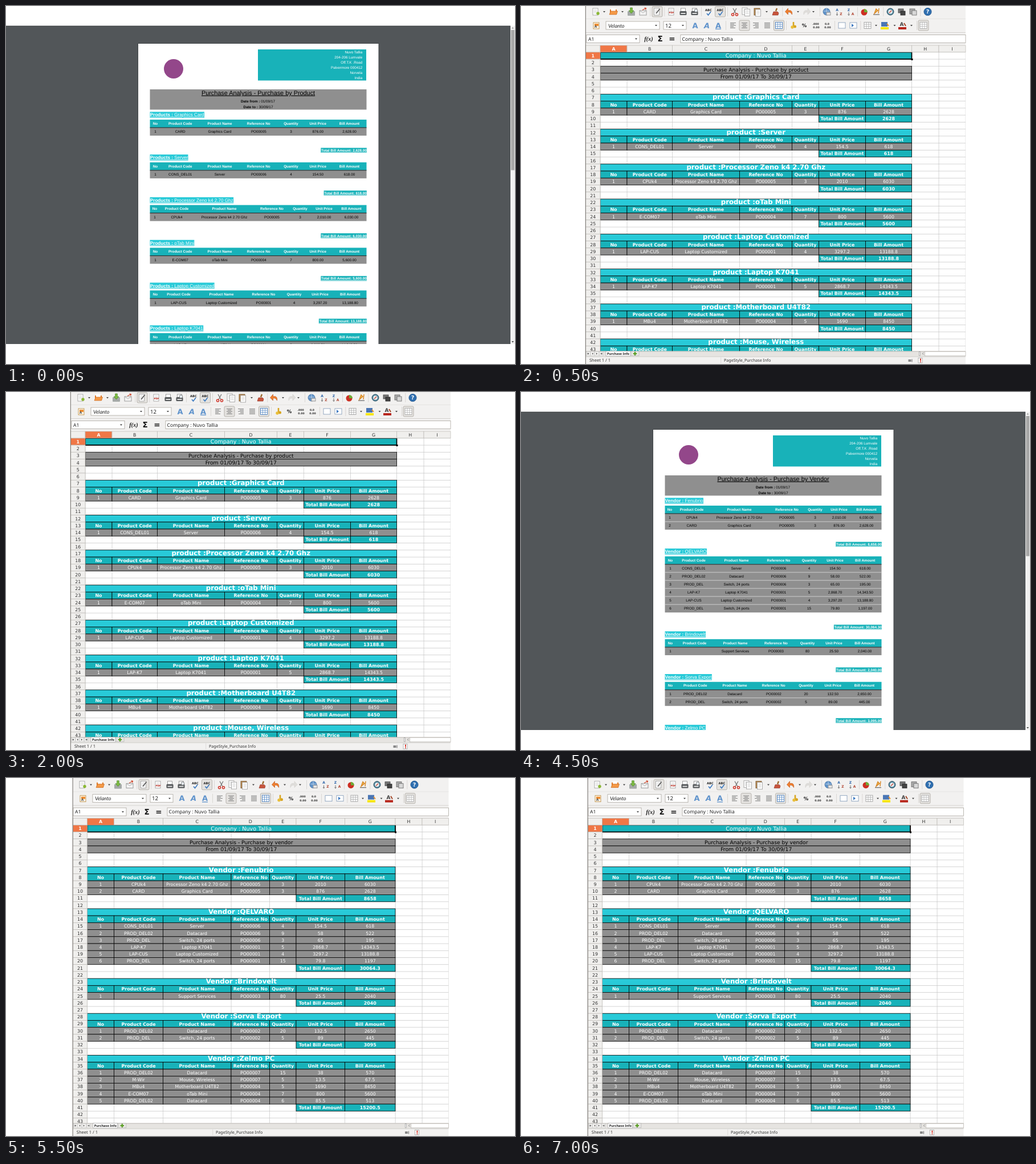
Animation of 893x627 px, one loop 8 s. Source, as an HTML page:

```html
<!DOCTYPE html>
<html lang="en">
<head>
<meta charset="utf-8">
<title>Purchase analysis reports</title>
<style>
html, body { margin: 0; width: 100%; height: 100%; overflow: hidden; background: #fff; }
svg { display: block; width: 100vw; height: 100vh; }
text { text-rendering: geometricPrecision; }
.pdf { font-family: "Liberation Sans", Arial, sans-serif; }
.calc { font-family: "DejaVu Sans", sans-serif; }
.ui { font-family: "Noto Sans", sans-serif; }
.serif { font-family: "Liberation Serif", serif; }
.lato { font-family: Lato, sans-serif; }
.m { text-anchor: middle; }
.e { text-anchor: end; }
.b { font-weight: bold; }
.i { font-style: italic; }
.u { text-decoration: underline; }
</style>
</head>
<body>
<svg id="stage" viewBox="0 0 893 627" preserveAspectRatio="none"></svg>
<script>
const TEAL = '#18b2b9', CYAN = '#28cad8', GREY = '#8f8f8f', PANEL = '#f2f1f0';
const COMPANY = 'Nuvo Tallia';
const HEAD = ['No', 'Product Code', 'Product Name', 'Reference No', 'Quantity', 'Unit Price', 'Bill Amount'];

// code, name, reference, quantity, unit price
const item = (code, name, ref, qty, price) => ({ code, name, ref: 'PO0000' + ref, qty, price, sum: qty * price });
const card = item('CARD', 'Graphics Card', 5, 3, 876);
const server = item('CONS_DEL01', 'Server', 6, 4, 154.5);
const cpu = item('CPUk4', 'Processor Zeno k4 2.70 Ghz', 5, 3, 2010);
const tablet = item('E-COM07', 'oTab Mini', 4, 7, 800);
const custom = item('LAP-CUS', 'Laptop Customized', 1, 4, 3297.2);
const laptop = item('LAP-K7', 'Laptop K7041', 1, 5, 2868.7);
const board = item('MBu4', 'Motherboard U4T82', 4, 5, 1690);
const mouse = item('M-Wir', 'Mouse, Wireless', 7, 5, 13.5);
const data = (ref, qty, price) => item('PROD_DEL02', 'Datacard', ref, qty, price);
const port = (ref, qty, price) => item('PROD_DEL', 'Switch, 24 ports', ref, qty, price);

// column centres of the printed tables
const NARROW = [262, 305.7, 375, 443.3, 500, 547.3, 602.5];
const WIDE = [261, 299.5, 383, 466.5, 516, 558, 606];
const MID = [262, 303, 378, 452, 505.5, 551, 603.8];
const OPEN = [262, 304.5, 376, 447.5, 502.5, 549, 603];

const block = (name, cols, ...items) => ({ name, cols, items });
const products = [[card, NARROW], [server, NARROW], [cpu, WIDE], [tablet, NARROW], [custom, MID],
  [laptop, NARROW], [board, MID], [mouse, NARROW]].map(([it, cols]) => block(it.name, cols, it));
const vendors = [
  block('Fenubrio', WIDE, cpu, card),
  block('QELVARO', MID, server, data(6, 9, 58), port(6, 3, 65), laptop, custom, port(1, 15, 79.8)),
  block('Brindovelt', OPEN, item('', 'Support Services', 3, 80, 25.5)),
  block('Sorva Export', NARROW, data(2, 20, 132.5), port(2, 5, 89)),
  block('Zelmo PC', NARROW, data(7, 15, 38), mouse, board, tablet, data(4, 6, 85.5))
];

const money = n => n.toLocaleString('en-US', { minimumFractionDigits: 2, maximumFractionDigits: 2 });
const plain = n => String(+n.toFixed(2));
const total = b => b.items.reduce((s, it) => s + it.sum, 0);
const cells = (it, n, fmt) => [n + 1, it.code, it.name, it.ref, it.qty, fmt(it.price), fmt(it.sum)];

const rect = (x, y, w, h, fill, more = '') => `<rect x="${x}" y="${y}" width="${w}" height="${h}" fill="${fill}" ${more}/>`;
const box = (x, y, w, h, fill, line = '#000', sw = 0.8) => rect(x, y, w, h, fill, `stroke="${line}" stroke-width="${sw}"`);
const path = (d, line, sw = 1, fill = 'none') => `<path d="${d}" fill="${fill}" stroke="${line}" stroke-width="${sw}"/>`;
const dot = (x, y, r, fill, more = '') => `<circle cx="${x}" cy="${y}" r="${r}" fill="${fill}" ${more}/>`;
// y is the middle of the capitals
const text = (x, y, s, size, fill = '#000', cls = 'm') =>
  `<text x="${x}" y="${y + size * 0.36}" font-size="${size}" fill="${fill}" class="${cls}">${s}</text>`;
const clip = (id, x, y, w, h, body) =>
  `<clipPath id="${id}">${rect(x, y, w, h, '#000')}</clipPath><g clip-path="url(#${id})">${body}</g>`;

const pen = document.createElement('canvas').getContext('2d');
function widthOf(s, size, weight = '') {
  pen.font = `${weight} 100px "Liberation Sans", Arial, sans-serif`;
  return pen.measureText(s).width * size / 100;
}

function printBlock(b, label, y) {
  const size = 6.35, lead = label + ' :', n = b.items.length, top = y + 22.4, end = top + 14.05 * n;
  const w = widthOf(lead + ' ', 8.14, 'bold') + widthOf(b.name, 8.14);
  const sum = 'Total Bill Amount: ' + money(total(b)), sw = widthOf(sum, 6.3, 'bold');
  let s = rect(252.5, y - 5.3, w + 0.5, 10.7, CYAN) +
    text(252.8, y - 0.2, `<tspan class="b">${lead}</tspan> ${b.name}`, 8.14, '#fff', 'u') +
    rect(252.5, y + 8.4, 380, 14, TEAL) + rect(252.5, top, 380, end - top, GREY) +
    rect(252.5, top - 0.5, 380, 1, '#222');
  b.cols.forEach((x, c) => s += text(x, y + 14.9, HEAD[c], size, '#fff', 'm b'));
  b.items.forEach((it, r) => {
    const ry = top + 14.05 * r;
    if (r) s += rect(252.5, ry - 0.4, 380, 0.8, '#ddd');
    cells(it, r, money).forEach((v, c) => s += text(b.cols[c], ry + 7.1, v, size));
  });
  return s + rect(632.8 - sw - 0.4, end + 21.4, sw + 0.4, 8.6, TEAL) +
    text(632.8, end + 25.6, sum, 6.3, '#fff', 'e b u');
}

function report(id, kind, label, blocks) {
  let s = rect(0, 34.5, 885, 557.5, '#525659') + rect(0, 34.5, 885, 1.2, '#3c3f42') +
    rect(231, 65, 423.5, 540, '#43474a') + rect(232, 66, 421.5, 540, '#fff') +
    dot(294, 110, 17, '#93478a') + rect(442, 76, 190, 54.5, TEAL);
  [COMPANY, '204-206 Lumvale', 'Off.T.K .Road', 'Palvermore 000412', 'Norvela', 'India']
    .forEach((line, n) => s += text(625.3, 80.8 + 9.05 * n, line, 6.35, '#fff', 'e'));
  s += rect(252.5, 146, 380, 35.5, GREY) +
    text(442.5, 151.8, 'Purchase Analysis - Purchase by ' + kind, 10.87, '#000', 'm u') +
    text(442, 167.2, '<tspan class="b">Date from :</tspan> 01/09/17', 6.35) +
    text(442.5, 176.6, '<tspan class="b">Date to :</tspan> 30/09/17', 6.35);
  let y = 190.6;
  for (const b of blocks) {
    s += printBlock(b, label, y);
    y += 60.75 + 14.05 * b.items.length;
  }
  s += rect(885, 34.5, 8, 557.5, '#f1f1f1') + rect(886, 42, 6, 245.5, '#a8a8a8') +
    path('M887 39.5h4l-2-2.4z', 'none', 0, '#999') + path('M887 587h4l-2 2.4z', 'none', 0, '#444');
  return `<g class="pdf">${clip(id, 0, 34.5, 893, 557.5, s)}</g>`;
}

const drop = (x, y) => path(`M${x - 2} ${y - 1}h4l-2 2.5z`, 'none', 0, '#444');
const rule = (x, y) => rect(x, y - 8, 0.7, 16, '#cfccc8');
const pressed = (x, y) => rect(x - 9, y - 9, 18, 18, '#e4e2df', 'rx="2" stroke="#aaa69f" stroke-width=".8"');
const sheetIcon = (x, y, line = '#999') => box(x - 5, y - 6, 9, 12, '#fff', line, 0.8) +
  path(`M${x - 3} ${y - 3}h5m-5 2.5h5m-5 2.5h5`, '#bbb', 0.7);
const printer = (x, y) => rect(x - 4, y - 6, 8, 6, '#fff', 'stroke="#777" stroke-width=".7"') +
  rect(x - 6, y - 1, 12, 7, '#55585a', 'rx="1.5"') + rect(x - 4, y + 2, 8, 2, '#ddd');
const lines = (x, y, ws, at) => ws.map((w, n) => rect(x - 5 + (10 - w) * at, y - 5 + n * 2.2, w, 1.1, '#888')).join('');
const table = (x, y, line) => box(x - 6, y - 5.5, 12, 11, '#fff', line, 0.9) +
  path(`M${x - 6} ${y - 2}h12m-12 3.7h12M${x - 2} ${y - 5.5}v11m4-11v11`, line, 0.7);

function topIcons(y) {
  const abc = x => text(x, y - 3, 'ABC', 5.2, '#222', 'm b') + path(`M${x - 3} ${y + 3}l2.5 3 4.5-6`, '#3878c0', 1.6);
  const sort = (x, a, b) => text(x - 3, y - 3.5, a, 6, '#2a62a8', 'm b') + text(x + 4, y + 3.5, b, 6, '#b04430', 'm b') +
    path(`M${x - 3} ${y + 1}v5m-1.5-1.5l1.5 2 1.5-2`, '#555', 0.8);
  return sheetIcon(131, y) + dot(135, y + 3, 2.7, '#8ab833') + drop(146, y) +
    rect(156, y - 4, 12, 9, '#e07a28', 'rx="1"') + rect(158, y - 6, 8, 5, '#fff') + path(`M155 ${y + 5}l2.5-6h12l-2 6z`, '#c05d10', 0.6, '#f59a48') + drop(178, y) +
    rect(187, y - 1, 13, 8, '#a5aaa8', 'rx="1"') + path(`M193.5 ${y + 3}l-4.5-5h2.6v-5h3.8v5h2.6z`, '#3d7d20', 0.6, '#7dbb42') +
    box(208, y - 2, 12, 8, '#f4f4f4', '#888') + path(`M208 ${y - 2}l6 4 6-4`, '#999', 0.7) + path(`M213 ${y - 3}l6-3m-2.5-1l3 .8-1 2.8`, '#d04a30', 1.2) +
    rule(226.5, y) + pressed(239, y) + sheetIcon(238.5, y) + path(`M237 ${y + 3}l6.5-8`, '#555', 1.6) + rule(251.5, y) +
    sheetIcon(264, y) + text(264, y + 2, 'PDF', 4, '#c23024', 'm b') + printer(284.5, y) + printer(304.5, y) + dot(307, y - 2, 2.8, '#e9f1f8', 'stroke="#666" stroke-width=".8"') +
    rule(316, y) + abc(329) + pressed(349.5, y) + abc(349.5) + rule(362, y) +
    path(`M372 ${y - 6}l5 9m1-9l-5 9`, '#777', 1.3) + dot(371.5, y + 5, 2, 'none', 'stroke="#d03428" stroke-width="1.5"') + dot(378.5, y + 5, 2, 'none', 'stroke="#d03428" stroke-width="1.5"') +
    sheetIcon(393, y - 1) + sheetIcon(397.5, y + 1.5) + box(409, y - 6, 10, 12, '#b98a52', '#76542c') + sheetIcon(416.5, y + 2) + drop(431, y) +
    path(`M449 ${y - 6}l-2 5`, '#9b6a2c', 2.4) + path(`M443 ${y}h7l2 2-1 4h-10z`, '#8c2a20', 0.6, '#c8553c') + rule(458.5, y) +
    path(`M475.5 ${y + 5}c1-7-3-8-7-7v-4l-5 6 5 5v-4c3-.5 5 0 7 4z`, '#b84c10', 0.6, '#f08030') + drop(486, y) +
    path(`M496 ${y + 5}c-1-7 3-8 7-7v-4l5 6-5 5v-4c-3-.5-5 0-7 4z`, '#d4d2cf', 0.6, '#dfddda') + drop(513, y) + rule(524, y) +
    dot(536, y, 6, '#5f92c8', 'stroke="#3c6aa0" stroke-width=".7"') + path(`M531 ${y - 1}h10M536 ${y - 6}v12`, '#cfe0f0', 0.8) + box(536, y + 1, 7, 5, '#e5e5e5', '#777', 0.7) +
    sort(557.5, 'A', 'Z') + sort(578, 'Z', 'A') + rule(590, y) +
    dot(602, y + 1, 5.5, '#cc2f22') + path(`M602 ${y + 1}v-6a6 6 0 0 1 6 6z`, 'none', 0, '#6fae38') +
    path(`M618 ${y + 5}h11`, '#777', 1.4) + path(`M620 ${y + 3}l3-8 3 3zM628 ${y - 6}l-1 9`, '#d88a2c', 1.5, '#f1bd4e') + rule(635.5, y) +
    dot(648, y, 6, '#4f8398', 'stroke="#35586a" stroke-width="1"') + dot(648, y, 3.8, '#e5eef1') + path(`M646 ${y + 2}l4-4`, '#c43', 1.3) +
    box(662, y - 5, 9, 7, '#777', '#444') + box(666, y - 1, 8, 7, '#444', '#222') +
    box(682, y - 5, 9, 9, '#aaa', '#666') + box(686, y - 2, 8, 8, '#d8d8d8', '#666') + rule(700.5, y) +
    dot(713.5, y, 6.6, '#2f6fb0', 'stroke="#1f5288" stroke-width=".8"') + text(713.5, y, '?', 9.5, '#fff', 'm b');
}

function formatIcons(y) {
  const letter = (x, cls) => text(x, y, 'A', 13, '#5f93cc', 'm b ' + cls);
  const dec = (x, s) => text(x, y - 3, s, 4.6, '#333', 'm b') + text(x + 1, y + 3.5, '0.00', 4.6, '#333', 'm b');
  const indent = (x, d) => box(x - 6, y - 5, 12, 10, '#fff', '#7d96b5') + path(`M${x - 3 * d} ${y - 3}l${4 * d} 3-${4 * d} 3z`.replace('--', ''), 'none', 0, '#3c78c0');
  return box(127, y - 5, 10, 11, '#fdf6e8', '#b88838') + rect(129, y - 3, 7, 4, '#f08d30') + text(131, y + 2, 'A', 6, '#555', 'm b') +
    box(149, y - 7, 94, 14, '#fff', '#aaa69f') + text(153, y + 0.3, 'Velanto', 9, '#222', 'lato i') + drop(237, y) +
    box(250, y - 7, 40, 14, '#fff', '#aaa69f') + text(253, y + 0.3, '12', 9.6, '#222', 'ui') + drop(284, y) +
    letter(305.5, '') + letter(326, 'i') + letter(346, 'u') + rule(359, y) +
    lines(372, y, [10, 7, 10, 6, 9], 0) + pressed(392, y) + lines(392, y, [10, 6, 10, 6, 10], 0.5) + lines(412, y, [10, 7, 10, 6, 9], 1) +
    lines(432, y, [10, 10, 10, 10, 10], 0) + pressed(452.5, y) + table(452.5, y, '#4a80c0') + rule(465, y) +
    path(`M478 ${y - 6}v7`, '#d8a520', 2.6) + dot(476, y + 3, 2.7, '#e9bf3a') + dot(480.5, y + 2, 2.5, '#d8a520') +
    text(497, y, '%', 8.5, '#222', 'm b') + dec(517, '.000') + dec(537, '0.0') + rule(550, y) +
    indent(563, -1) + indent(583, 1) + rule(595.5, y) + table(608, y, '#a0a0a0') + drop(623, y) +
    rect(632, y - 6, 11, 8, '#4a76b5') + rect(631, y + 3, 14, 4, '#f7e600') + path(`M642 ${y - 3}l3 4`, '#e8912c', 1.8) + drop(655.5, y) +
    text(668, y - 2, 'A', 9, '#444', 'm b') + rect(662, y + 3, 14, 4, '#b8261c') + path(`M672 ${y - 4}l3 5`, '#a04020', 1.8) + drop(685, y) + rule(694, y) +
    pressed(706, y) + table(706, y, '#aaa');
}

function sheet(o) {
  const { cols, top, step } = o, left = o.left, right = cols[9], floor = 604.6;
  const last = cols[7], midX = (cols[0] + last) / 2, at = r => top + (r - 1) * step;
  const mid = c => (cols[c] + cols[c + 1]) / 2;
  const cell = (r, c, v, fill, size, cls) => box(cols[c], at(r), cols[c + 1] - cols[c], step, fill) +
    text(mid(c), at(r) + step / 2 + 0.1, v, size, '#fff', cls);
  const band = (r, v, fill, size, ink, cls = 'm', dy = 0) => box(cols[0], at(r), last - cols[0], step, fill) +
    text(midX, at(r) + step / 2 + dy, v, size, ink, cls);

  let g = rect(left, top, right - left, 540, '#fff');
  for (let r = 1; r < 45; r++) g += rect(cols[0], at(r) - 0.3, right - cols[0], 0.7, '#c4c4c4');
  cols.forEach(x => g += rect(x - 0.3, top, 0.7, 540, '#c4c4c4'));
  g += band(3, 'Purchase Analysis - Purchase by ' + o.label.toLowerCase(), GREY, 9.15, '#000') +
    band(4, 'From 01/09/17 To 30/09/17', GREY, 9.3, '#000');
  let r = 7;
  for (const b of o.blocks) {
    g += band(r++, `${o.head} :${b.name}`, CYAN, 11.7, '#fff', 'm b', -1.2);
    HEAD.forEach((h, c) => g += cell(r, c, h, TEAL, 7.95, 'm b'));
    r++;
    b.items.forEach((it, n) => {
      cells(it, n, plain).forEach((v, c) => g += cell(r, c, v, GREY, 7.75, 'm'));
      r++;
    });
    g += cell(r, 5, 'Total Bill Amount', TEAL, 7.9, 'm b') + cell(r, 6, plain(total(b)), TEAL, 7.9, 'm b');
    r += 2;
  }
  g += band(1, 'Company : ' + COMPANY, TEAL, 9.6, '#fff') +
    rect(cols[0], top, last - cols[0], step, 'none', 'stroke="#000" stroke-width="1.7"') + rect(last - 1, at(2) - 1, 3, 3, '#000');
  for (let n = 1; n < 45; n++) {
    g += box(left, at(n), cols[0] - left, step, n > 1 ? '#f0efed' : '#f07746', '#bdbab6', 0.7) +
      text((left + cols[0]) / 2, at(n) + step / 2, n, 7.9, n > 1 ? '#333' : '#fff', n > 1 ? 'm' : 'm b');
  }

  const hy = top - 11.8;
  let s = rect(left, 0, right - left, 627, PANEL) + clip(o.id, left, top - 1, right - left, floor - top + 1, g);
  s += box(left, hy, cols[0] - left, 11.8, '#f0efed', '#bdbab6', 0.7);
  [...'ABCDEFGHI'].forEach((ch, c) => s += box(cols[c], hy, cols[c + 1] - cols[c], 11.8, c ? '#f0efed' : '#f07746', '#bdbab6', 0.7) +
    text(mid(c), hy + 5.9, ch, 7.9, c ? '#333' : '#fff', c ? 'm' : 'm b'));

  // toolbars and formula bar
  const [dx, dy] = o.shift, end = right - dx;
  s += `<g transform="translate(${dx} ${dy})">` + topIcons(10) + formatIcons(34) +
    rect(left - dx, 22, end - left + dx, 0.6, '#dedbd7') + rect(left - dx, 46, end - left + dx, 0.7, '#c9c6c2') +
    box(115, 50.5, 93, 14, '#fff', '#aaa69f') + text(118, 57.6, 'A1', 8.5, '#222', 'ui') + drop(202, 57.6) +
    text(224, 57.4, 'f(x)', 10.5, '#222', 'm b i serif') + text(244, 57.4, 'Σ', 13.5, '#111', 'm b') + text(265, 57.4, '=', 13.5, '#111', 'm b') +
    box(280, 50.5, end - 280, 14, '#fff', '#aaa69f') + text(282.5, 57.6, 'Company : ' + COMPANY, 8.6, '#222', 'ui') + '</g>';

  // sheet tabs, scrollbar, status line
  const bx = left - 113.5, sx = o.scroll;
  s += rect(left, floor, right - left, 9.4, '#e6e4e1') + rect(left, floor, right - left, 0.7, '#aaa69f') +
    rect(left, 613.8, right - left, 0.7, '#c4c1bd');
  [118, 125.5, 133, 141].forEach((x, n) => {
    const d = n < 2 ? -1 : 1, tx = x + bx;
    s += box(tx - 3.5, 605.6, 7, 6.6, '#f4f3f1', '#bbb', 0.5) + path(`M${tx - d} 607.2L${tx + d} 608.9L${tx - d} 610.6z`, 'none', 0, '#444');
    if (n % 3 === 0) s += rect(tx + d * 1.7 - 0.3, 607.2, 0.6, 3.4, '#444');
  });
  s += box(bx + 149, 604.6, 43, 8.4, '#fff', '#999', 0.6) + text(bx + 170.5, 608.7, 'Purchase Info', 5.7, '#222', 'm b ui') +
    box(bx + 193, 604.8, 14, 7.8, '#e9e8e5', '#aaa', 0.6) + path(`M${bx + 200} 605.6v6.4m-3.2-3.2h6.4`, '#5c9e28', 2.2) +
    rect(sx, 605.5, 2, 7, '#fff', 'stroke="#888" stroke-width=".6"') + path(`M${sx + 8} 606.8l-2.2 2 2.2 2`, '#777', 0.8) +
    box(sx + 10, 605.2, right - sx - 10, 7.6, '#fff', '#b5b1ac', 0.7) +
    text(bx + 120, 620.6, 'Sheet 1 / 1', 7.5, '#333', 'ui') + text(o.style, 620.6, 'PageStyle_Purchase Info', 7.15, '#333', 'ui') +
    rect(bx + 350.5 + o.style - 356 - bx, 615.5, 0.6, 10, '#cfccc8') +
    rect(o.status - 3.5, 619, 5, 4, '#888') + rect(o.status + 2.5, 618.5, 1, 5, '#666') +
    box(o.status + 14, 616.5, 7, 8.5, '#fff', '#999', 0.7) + rect(o.status + 17, 617.5, 1.8, 4, '#d0281c') + rect(o.status + 17, 622.5, 1.8, 1.6, '#d0281c') +
    rect(left - 0.7, 0, 1, 627, '#6a6661');
  return `<g class="calc">${s}</g>`;
}

const scenes = [
  [0, report('pageA', 'Product', 'Products', products)],
  [500, sheet({
    id: 'gridA', label: 'product', head: 'product', blocks: products, left: 113.5, top: 80.8, step: 12.25, shift: [0, 0],
    cols: [139, 186, 265.5, 383.5, 475.5, 522.5, 604.5, 685.5, 733, 780], scroll: 698.5, style: 356, status: 683
  })],
  [3000, report('pageB', 'Vendor', 'Vendor', vendors)],
  [5500, sheet({
    id: 'gridB', label: 'vendor', head: 'Vendor', blocks: vendors, left: 117.3, top: 82.3, step: 12.22, shift: [3, 1.7],
    cols: [142.5, 189.5, 275.5, 395, 462.5, 509, 594.5, 683, 730, 776.5], scroll: 700.5, style: 368, status: 703.5
  })]
];

const stage = document.getElementById('stage');
stage.innerHTML = rect(0, 0, 893, 627, '#fff') + scenes.map(([, body]) => `<g class="scene" visibility="hidden">${body}</g>`).join('');
const layers = [...stage.querySelectorAll('.scene')];

function draw(ms) {
  const t = ms % 8000;
  const now = scenes.filter(([start]) => start <= t).length - 1;
  layers.forEach((g, n) => g.setAttribute('visibility', n === now ? 'visible' : 'hidden'));
}

function tick() {
  draw(performance.now());
  requestAnimationFrame(tick);
}
tick();
</script>
</body>
</html>
```
